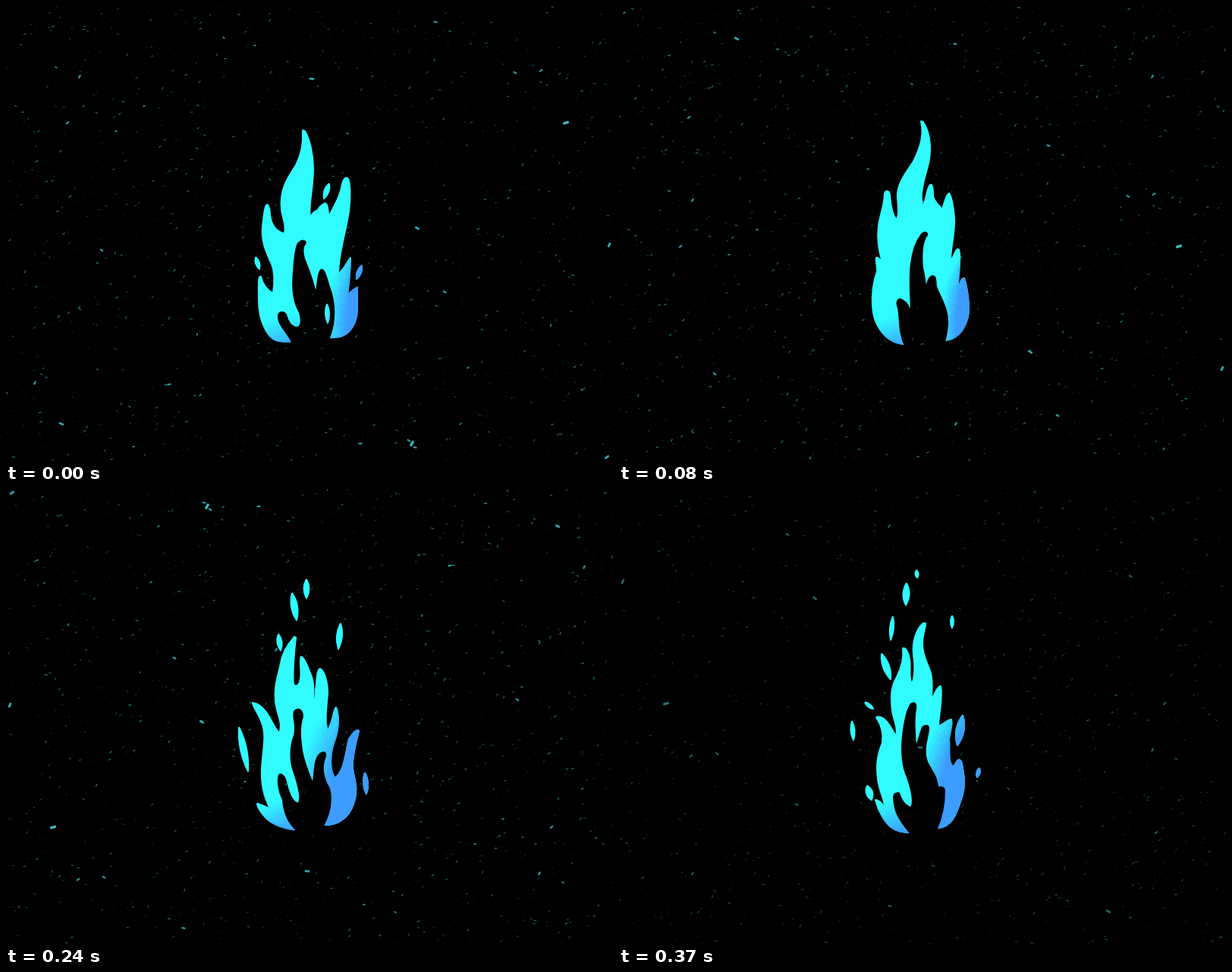
These frames come from a looping animation (800 by 600 pixels, 0.4 s). An HTML page with a canvas:

```html
<!DOCTYPE html>
<html lang="en">
<head>
<meta charset="utf-8">
<title>Blue flame</title>
<style>
  html, body { margin: 0; width: 100%; height: 100%; overflow: hidden; background: #000; }
  canvas { display: block; }
</style>
</head>
<body>
<canvas id="stage" width="800" height="600"></canvas>
<script>
const CYAN = '#30fbff', BLUE = '#3c9cff';
const W = 800, H = 600, STEP = 80, SKY_SHIFT = 163;
const ctx = document.getElementById('stage').getContext('2d');

// body: silhouette, core: dark heart, sparks: [x1, y1, x2, y2, width], blue: radii of the colour change
const poses = [
  {
    body: `M391 164C392 180 390 195 382 210C374 223 360 240 363 268C364 280 370 288 367 300
      C357 298 350 290 348 276C348 268 346 262 344 262C341 263 340 275 338 290C336 310 343 325 350 340
      C354 350 354 365 352 379C343 374 338 366 336 357C332 354 333 370 333 388C333 415 345 442 362 442
      Q370 443 377 442L430 437C448 438 462 425 463 400L463 371C458 374 452 378 450 383
      C451 370 454 350 454 332C450 336 447 346 438 353C438 325 448 300 452 270C454 255 454 235 451 228
      C448 224 445 228 443 235C441 250 432 265 425 278C425 270 424 262 421 260Q414 263 411 269
      Q404 272 401 279C398 265 405 240 405 215C405 195 400 175 394 165Z`,
    core: `M378 446C374 432 358 422 359 408C360 403 366 402 369 407C371 416 376 424 384 424
      C390 422 390 412 386 402C378 388 377 370 379 350C380 335 382 320 384 315C387 309 393 308 395 312
      C390 318 391 325 393 333C399 348 405 362 408 379C411 372 410 352 415 348C420 346 422 358 426 370
      C433 388 436 415 425 440V450Z`,
    sparks: [[426, 234, 419, 254, 7], [329, 331, 334, 347, 6], [469, 342, 462, 360, 6], [423, 393, 424, 418, 6]],
    blue: [150, 180]
  },
  {
    body: `M398 152C402 170 398 185 388 205C378 220 366 235 367 252C368 265 369 275 366 282
      C360 275 358 262 357 250C357 243 351 242 350 248C350 262 344 275 342 290C340 308 342 320 347 338
      Q341 330 339 332C338 338 341 345 340 350C335 365 333 380 334 395C335 420 350 444 377 446
      L430 441C452 438 462 415 461 395C460 380 458 368 455 359C452 358 450 364 447 373
      C446 355 452 335 448 321C444 318 442 330 437 336C437 318 443 300 442 280C441 265 438 250 435 247
      C431 248 429 260 426 268C422 263 415 258 414 250C414 240 413 234 410 236C405 242 405 255 401 264
      C396 255 400 235 406 215C412 195 412 170 401 153Z`,
    core: `M378 450C368 430 371 415 368 398C365 391 367 385 372 387C380 391 384 398 385 408
      C385 385 382 360 385 340C387 322 392 310 398 302C402 297 407 298 406 302C400 310 398 322 400 345
      Q404 362 404 374C406 366 408 357 413 356C418 356 417 362 418 370C424 385 434 400 433 420
      Q432 435 428 446V452Z`,
    sparks: [],
    blue: [155, 178]
  },
  {
    body: `M392 188C384 205 388 220 387 235C386 248 384 258 379 261C374 255 377 240 372 228
      C370 220 364 214 362 218C364 232 360 245 355 260C350 275 350 285 353 298C356 310 358 318 357 328
      C352 322 353 314 345 308C340 304 337 304 338 308C342 318 343 325 342 340C341 365 341 385 346 408
      C351 430 362 447 378 447L422 444C440 444 450 430 454 412C457 400 458 392 456 388Q453 386 449 392
      C446 375 452 360 453 340C454 322 459 305 458 290C457 282 454 280 452 284C449 296 446 305 446 318
      C445 330 440 345 434 349C432 330 438 310 438 290C439 278 439 268 437 267C433 268 433 278 430 286
      C428 292 425 298 421 298C418 285 418 268 410 254C407 258 408 270 407 276C403 268 405 255 405 245
      C404 225 398 210 398 190Z`,
    core: `M380 450C370 430 372 410 370 398C362 390 362 375 364 360C365 350 367 345 374 347
      C377 355 373 365 378 378Q383 390 385 396C387 380 382 360 386 340C389 328 394 318 403 318
      C403 325 397 335 398 350C398 365 400 372 399 388C403 380 402 362 406 356C411 353 412 360 412 370
      C418 385 428 395 428 410C428 425 426 435 421 445V452Z`,
    sparks: [[397, 143, 394, 177, 11], [438, 195, 438, 235, 10], [315, 346, 321, 398, 10], [475, 390, 470, 415, 10]],
    blue: [185, 215]
  },
  {
    body: `M380 195C373 203 364 215 362 230C358 248 353 262 355 280C357 298 366 310 360 322
      C352 312 348 300 341 292C336 286 330 282 325 282C327 290 333 297 337 308C344 325 338 345 337 370
      C336 395 342 410 348 421C342 420 336 415 331 415C332 422 337 427 341 432C348 440 362 447 380 449
      L418 443C435 444 452 435 458 415C464 398 460 385 458 375C454 360 461 335 465 319
      C462 316 457 322 452 330C448 345 446 375 433 381C426 370 427 350 432 335C438 320 440 300 435 288
      C431 292 432 305 424 318C420 310 422 290 424 270C424 255 420 240 414 237C409 238 410 255 408 265
      Q408 278 405 287C405 270 407 255 401 243C397 232 393 222 389 221C386 226 390 240 388 250
      C387 258 383 262 379 258C377 240 380 215 382 196Z`,
    core: `M383 450C372 440 366 425 365 410C360 400 357 385 360 377C364 374 368 380 370 390
      C373 402 378 413 385 415C390 410 385 390 380 375C374 360 374 340 380 325C384 310 376 298 381 292
      C387 288 391 293 391 300C386 315 388 330 390 345C393 362 400 378 404 388C408 380 404 358 414 349
      C420 345 423 348 420 355C415 370 420 385 426 395C431 412 425 432 418 444V454Z`,
    sparks: [[396, 119, 396, 144, 8], [377, 137, 383, 173, 9], [359, 191, 362, 213, 7],
      [441, 177, 438, 211, 8], [307, 314, 319, 372, 9], [473, 374, 475, 402, 7]],
    blue: [175, 220]
  },
  {
    body: `M401 177C393 183 386 200 388 218C390 232 391 245 386 257C381 250 385 235 383 225
      C382 215 377 208 374 210C376 225 371 238 366 248C358 262 358 275 360 292C362 305 368 315 365 326
      C360 318 356 308 349 303Q343 299 339 301C345 310 349 322 347 335C340 352 339 365 341 382
      C343 400 350 408 350 419Q343 410 338 410C342 425 350 440 360 447C367 452 376 453 384 453
      L420 447C438 446 444 430 449 415C455 400 456 385 454 375C452 366 453 358 448 357
      C444 358 444 364 440 366C433 360 436 345 435 330C436 320 440 310 438 304C434 303 430 309 421 313
      C421 300 427 275 424 260C420 260 416 270 412 278C412 268 414 255 411 243C407 230 400 220 400 205
      C400 190 405 180 404 177Z`,
    core: `M386 456C376 445 364 430 363 415C361 405 362 400 369 401C372 410 376 418 385 420
      C390 412 385 395 380 380C373 365 372 345 374 325C376 308 380 290 385 283C390 281 392 283 391 290
      C388 305 390 320 391 340C394 335 397 322 400 314C405 310 409 312 408 318C405 335 401 345 406 360
      C412 372 420 380 420 394C424 392 429 393 429 398C429 415 425 435 418 450V456Z`,
    sparks: [[392, 107, 393, 117, 5], [379, 124, 378, 153, 9], [361, 168, 358, 199, 6], [439, 167, 439, 183, 5],
      [346, 217, 358, 251, 9], [324, 281, 335, 290, 5], [307, 306, 309, 331, 6], [475, 368, 472, 380, 5],
      [453, 298, 446, 338, 11], [327, 391, 333, 410, 9]],
    blue: [178, 212]
  }
];

// Bright dust: x, y, size
const brightDust = [
  [738, 154, 5], [542, 293, 4], [535, 577, 5], [531, 573, 3], [539, 582, 3], [403, 96, 4], [97, 93, 3],
  [66, 81, 2], [566, 21, 3], [671, 88, 3], [705, 85, 3], [287, 42, 2], [328, 52, 2], [81, 154, 3],
  [145, 165, 2], [182, 132, 2], [126, 322, 3], [252, 433, 2], [215, 499, 3], [256, 513, 2], [38, 497, 3],
  [73, 551, 4], [168, 581, 2], [467, 577, 3], [578, 377, 3], [609, 477, 2], [599, 551, 2], [795, 315, 4],
  [792, 595, 4], [759, 506, 2], [718, 421, 2], [450, 168, 2], [485, 214, 2], [155, -120, 4], [126, -128, 2],
  [209, -106, 2], [443, -113, 3], [703, -70, 3], [386, -60, 2], [92, -16, 3], [444, 388, 3], [7, -154, 2]
];

function randomFrom(seed) {
  return () => {
    seed = (seed + 0x6d2b79f5) | 0;
    let t = Math.imul(seed ^ (seed >>> 15), 1 | seed);
    t = (t + Math.imul(t ^ (t >>> 7), 61 | t)) ^ t;
    return ((t ^ (t >>> 14)) >>> 0) / 4294967296;
  };
}

function makeSky() {
  const sky = document.createElement('canvas');
  sky.width = W;
  sky.height = H + SKY_SHIFT;
  const c = sky.getContext('2d'), random = randomFrom(7);
  c.lineCap = 'round';
  const fleck = (x, y, length, width, alpha) => {
    const angle = -random() * 1.9 + 0.6;
    const dx = Math.cos(angle) * length / 2, dy = Math.sin(angle) * length / 2;
    c.globalAlpha = alpha;
    c.lineWidth = width;
    c.beginPath();
    c.moveTo(x - dx, y - dy);
    c.lineTo(x + dx, y + dy);
    c.stroke();
  };
  c.strokeStyle = '#2a8a86';
  for (let i = 0; i < 4200; i++) {
    const weight = random() ** 5;
    fleck(random() * W, random() * sky.height, 0.4 + weight * 2.6, 0.8 + weight * 0.6, 0.22 + weight * 0.6);
  }
  c.strokeStyle = '#35c9cc';
  for (const [x, y, size] of brightDust) fleck(x, y + SKY_SHIFT, size, 0.8 + size * 0.5, 0.5 + size * 0.09);
  return sky;
}

function addLeaf(path, [x1, y1, x2, y2, width]) {
  const length = Math.hypot(x2 - x1, y2 - y1);
  const bulge = (width - 1) / length;
  const mx = (x1 + x2) / 2, my = (y1 + y2) / 2;
  const ox = (y2 - y1) * bulge, oy = (x1 - x2) * bulge;
  path.moveTo(x1, y1);
  path.quadraticCurveTo(mx + ox, my + oy, x2, y2);
  path.quadraticCurveTo(mx - ox, my - oy, x1, y1);
}

function paint(path, color) {
  ctx.fillStyle = ctx.strokeStyle = color;
  ctx.fill(path);
  ctx.stroke(path);
}

function glow(x, y, inner, outer) {
  const gradient = ctx.createRadialGradient(x, y, inner, x, y, outer);
  gradient.addColorStop(0, BLUE);
  gradient.addColorStop(1, '#3c9cff00');
  return gradient;
}

// Sprayed dots along the colour change
function spray(body, [inner, outer]) {
  const random = randomFrom(3);
  ctx.save();
  ctx.clip(body);
  ctx.globalAlpha = 0.45;
  for (let i = 0; i < 700; i++) {
    const mix = random(), angle = Math.PI * (0.95 + random() * 0.35);
    const radius = inner + (outer - inner) * mix;
    ctx.fillStyle = random() < mix ? CYAN : BLUE;
    ctx.fillRect(600 + Math.cos(angle) * radius, 420 + Math.sin(angle) * radius, 1.2, 1.2);
  }
  ctx.restore();
}

const sky = makeSky();
for (const pose of poses) {
  pose.body = new Path2D(pose.body);
  pose.core = new Path2D(pose.core);
  pose.leaves = new Path2D();
  pose.sparks.forEach(spark => addLeaf(pose.leaves, spark));
}

function drawSky(index) {
  ctx.save();
  ctx.globalCompositeOperation = 'lighten';
  if (index > 2) {
    ctx.translate(W, H);
    ctx.rotate(Math.PI);
  }
  if (index === 4) ctx.globalAlpha = 0.6;
  const shifted = index === 1 || index === 4;
  ctx.drawImage(sky, 0, shifted ? 0 : -SKY_SHIFT);
  ctx.restore();
}

function draw(index) {
  const { body, core, leaves, blue } = poses[index];
  ctx.fillStyle = '#000';
  ctx.fillRect(0, 0, W, H);
  ctx.lineJoin = 'round';
  ctx.lineWidth = 2;
  const tints = [CYAN, glow(600, 420, ...blue), glow(378, 468, 15, 62)];
  for (const tint of tints) paint(body, tint);
  spray(body, blue);
  paint(core, '#000');
  for (const tint of tints) paint(leaves, tint);
  drawSky(index);
}

let shown = -1;
function tick() {
  const index = Math.floor(performance.now() / STEP) % poses.length;
  if (index !== shown) draw(shown = index);
  requestAnimationFrame(tick);
}
tick();
</script>
</body>
</html>
```
